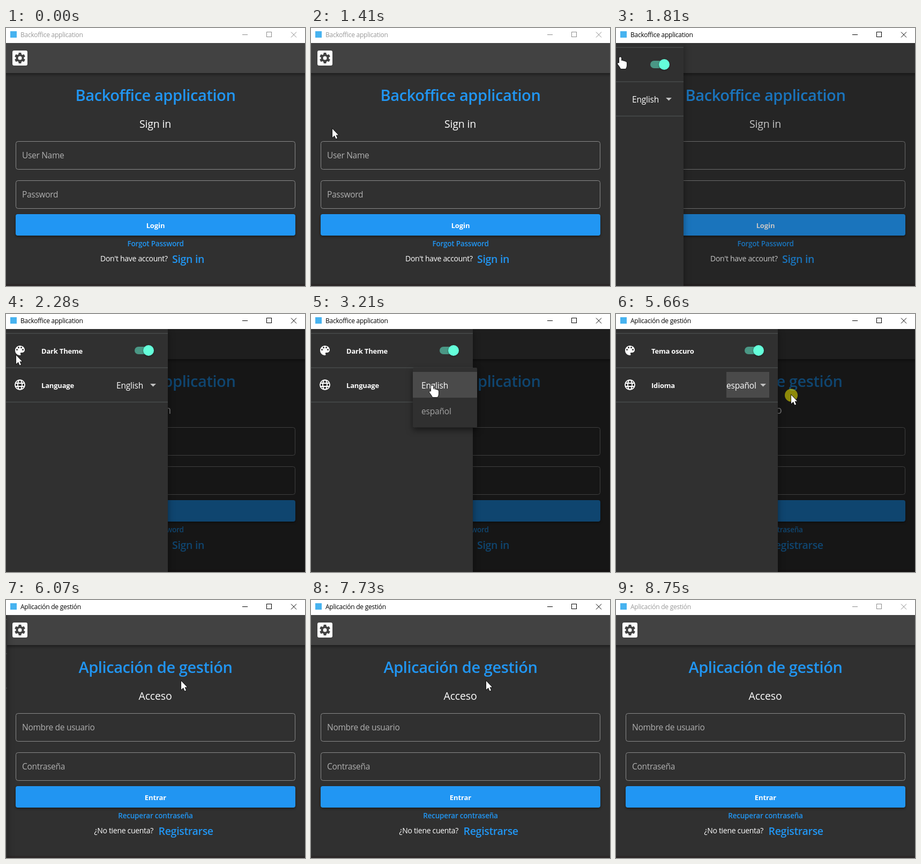
An HTML page with a canvas for the animation above (8880 ms loop, 558 px wide and 481 px high).

```html
<!DOCTYPE html>
<html lang="en">
<head>
<meta charset="utf-8">
<title>Backoffice application</title>
<style>
html, body { margin: 0; width: 100%; height: 100%; overflow: hidden; background: #303030; }
canvas { display: block; }
</style>
</head>
<body>
<canvas id="stage" width="558" height="481"></canvas>
<script>
const LOOP = 8880, W = 558, H = 481, DRAWER = 302;
const ctx = document.getElementById('stage').getContext('2d');

const EN = {
  app: 'Backoffice application', heading: 'Sign in', user: 'User Name', pass: 'Password',
  login: 'Login', forgot: 'Forgot Password', ask: "Don't have account?", askX: 176,
  join: 'Sign in', joinX: 310, theme: 'Dark Theme', lang: 'Language', name: 'English'
};
const ES = {
  app: 'Aplicación de gestión', heading: 'Acceso', user: 'Nombre de usuario', pass: 'Contraseña',
  login: 'Entrar', forgot: 'Recuperar contraseña', ask: '¿No tiene cuenta?', askX: 164.5,
  join: 'Registrarse', joinX: 284.5, theme: 'Tema oscuro', lang: 'Idioma', name: 'español'
};

const OPEN = 1747, MENU_OPEN = 3030, MENU_CLOSE = 4550, SWITCH = 4590, CLOSE = 5740;
const CLICKS = [[1600, 1740], [2900, 3130], [4470, 4690], [5660, 5960]];
const PATH = [
  [1130, 110, 478], [1580, 8, 54], [1950, 8, 54], [2280, 19, 77], [2820, 226, 133],
  [3810, 226, 133], [3940, 226, 181], [5130, 226, 181], [5520, 327, 151],
  [7730, 327, 151], [8280, 332, 482]
];

const ARROW = new Path2D('M0 0V16L4 12.5L6.5 18.5L9 17.5L6.5 11.5H11Z');
const HAND = new Path2D('M-2 1.5Q0-1.5 2 1.5V7Q4 6 5.5 7.5Q7.5 7 9 8.5Q12 8 12 11V16Q12 19 10 22H1Q-1 18-5 13Q-5 10-2 11.5Z');
const PALETTE = new Path2D('M12 3c-4.97 0-9 4.03-9 9s4.03 9 9 9c.83 0 1.5-.67 1.5-1.5 0-.39-.15-.74-.39-1.01-.23-.26-.38-.61-.38-.99 0-.83.67-1.5 1.5-1.5H16c2.76 0 5-2.24 5-5 0-4.42-4.03-8-9-8z');

const clamp = v => Math.min(1, Math.max(0, v));
const ramp = (t, from, length) => clamp((t - from) / length);

// Critically damped spring from 0 to 1.
function spring(ms) {
  if (ms <= 0) return 0;
  const k = 22.36 * ms / 1000;
  return 1 - (1 + k) * Math.exp(-k);
}

function text(str, x, y, size, color, { weight = 400, gap = -0.2, align = 'left' } = {}) {
  ctx.font = `${weight} ${size}px "Open Sans", "Noto Sans", sans-serif`;
  ctx.letterSpacing = gap + 'px';
  ctx.textAlign = align;
  ctx.fillStyle = color;
  ctx.fillText(str, x, y);
}

function rect(x, y, w, h, color) {
  ctx.fillStyle = color;
  ctx.fillRect(x, y, w, h);
}

function round(x, y, w, h, r, color) {
  ctx.beginPath();
  ctx.roundRect(x, y, w, h, r);
  ctx.fillStyle = color;
  ctx.fill();
}

function disc(x, y, r, color) {
  ctx.beginPath();
  ctx.arc(x, y, r, 0, 7);
  ctx.fillStyle = color;
  ctx.fill();
}

function lines(color, width, ...segments) {
  ctx.beginPath();
  for (const [x1, y1, x2, y2] of segments) {
    ctx.moveTo(x1, y1);
    ctx.lineTo(x2, y2);
  }
  ctx.strokeStyle = color;
  ctx.lineWidth = width;
  ctx.stroke();
}

function shadowed(blur, dy, alpha, draw) {
  ctx.save();
  ctx.shadowColor = `rgba(0,0,0,${alpha})`;
  ctx.shadowBlur = blur;
  ctx.shadowOffsetY = dy;
  draw();
  ctx.restore();
}

function titleBar(t, s) {
  const active = t >= 1640 && t < 8750;
  const ink = active ? '#000' : '#8c8c8c';
  rect(0, 0, W, 28, '#fff');
  rect(8, 6, 12, 12, '#47b3f0');
  text(s.app, 27, 17, 12, active ? '#000' : '#999', { gap: -0.24 });
  lines(ink, 1, [441, 12.5, 451, 12.5], [532, 7.5, 542, 17.5], [542, 7.5, 532, 17.5]);
  ctx.strokeRect(486.5, 7.5, 9, 9);
}

function gear(x, y) {
  round(x - 14, y - 14, 28, 28, 3, '#fff');
  ctx.save();
  ctx.translate(x, y);
  disc(0, 0, 7.4, '#424242');
  for (let i = 0; i < 6; i++) {
    round(-2.6, -10, 5.2, 6, 1, '#424242');
    ctx.rotate(Math.PI / 3);
  }
  disc(0, 0, 3.5, '#fff');
  ctx.restore();
}

function field(label, y, hover) {
  ctx.beginPath();
  ctx.roundRect(18.5, y + 0.5, 521, 52, 4);
  ctx.strokeStyle = hover ? '#a8a8a8' : '#8a8a8a';
  ctx.lineWidth = 1;
  ctx.stroke();
  text(label, 30, y + 32, 15.5, '#b0b0b0', { gap: -0.3 });
}

function page(s, over) {
  const mid = { align: 'center' };
  rect(0, 28, W, H - 28, '#303030');
  shadowed(6, 2, 0.5, () => rect(-10, 28, W + 20, 56, '#424242'));
  gear(26, 56);
  text(s.app, 279, 136, 29, '#2196f3', { ...mid, weight: 600, gap: -0.4 });
  text(s.heading, 278.5, 186, 19.5, '#fff', { ...mid, gap: -0.15 });
  field(s.user, 211, over === 'user');
  field(s.pass, 284, over === 'pass');
  shadowed(4, 2, 0.45, () => round(18, 347, 522, 40, 4, '#2196f3'));
  if (over === 'login') round(18, 347, 522, 40, 4, 'rgba(255,255,255,.08)');
  text(s.login, 279, 373, 13, '#fff', { ...mid, weight: 700, gap: -0.1 });
  text(s.forgot, 279, 407, 13.5, '#2196f3', { ...mid, weight: 600 });
  text(s.ask, s.askX, 435, 14, '#fff', { gap: -0.3 });
  text(s.join, s.joinX, 438, 19.5, '#2196f3', { weight: 600, gap: -0.3 });
  rect(0, 477, W, 4, 'rgba(30,10,10,.2)');
}

function globe(x, y) {
  ctx.beginPath();
  ctx.arc(x, y, 9, 0, 7);
  ctx.moveTo(x + 4, y);
  ctx.ellipse(x, y, 4, 9, 0, 0, 7);
  ctx.strokeStyle = '#fff';
  ctx.lineWidth = 1.9;
  ctx.stroke();
  lines('#fff', 1.9, [x - 8.5, y - 3, x + 8.5, y - 3], [x - 8.5, y + 3, x + 8.5, y + 3]);
}

function drawer(s, open, focused) {
  rect(0, 28, W, H - 28, `rgba(0,0,0,${0.54 * open})`);
  ctx.save();
  ctx.beginPath();
  ctx.rect(0, 28, W, H - 28);
  ctx.clip();
  ctx.translate(Math.round(DRAWER * (open - 1)), 0);
  shadowed(12, 4, 0.4, () => rect(0, 28, DRAWER, H - 28, '#303030'));
  for (const y of [36, 100, 164]) rect(0, y - 0.5, DRAWER, 1.5, '#474a4a');

  ctx.save();
  ctx.translate(14, 56);
  ctx.fillStyle = '#fff';
  ctx.fill(PALETTE);
  for (const [x, y] of [[6.5, 10.5], [9.5, 6.5], [14.5, 6.5], [17.5, 10.5]]) disc(x, y, 1.5, '#303030');
  ctx.restore();
  globe(26, 132);
  text(s.theme, 66, 74, 13, '#fff', { weight: 700 });
  text(s.lang, 66, 138, 13, '#fff', { weight: 700 });

  round(240, 61, 34, 14, 7, '#4a9785');
  shadowed(3, 1, 0.5, () => disc(266, 68, 10, '#64ffda'));

  if (focused) rect(206, 108, 80, 48, '#4a4a4a');
  text(s.name, 206, 139, 15.5, '#fff');
  ctx.beginPath();
  ctx.moveTo(269, 130);
  ctx.lineTo(280, 130);
  ctx.lineTo(274.5, 135.5);
  ctx.fillStyle = '#c1c1c1';
  ctx.fill();
  ctx.restore();
}

function menu(t, pointerY) {
  const alpha = ramp(t, MENU_OPEN, 75) * (1 - ramp(t, MENU_CLOSE, 75));
  if (!alpha) return;
  const grow = ramp(t, MENU_OPEN + 75, 75);
  const top = 108 - 8 * grow, bottom = 156 + 55.5 * grow;
  ctx.save();
  ctx.globalAlpha = alpha;
  shadowed(12, 5, 0.5, () => round(190, top, 120, bottom - top, 2, '#303030'));
  ctx.beginPath();
  ctx.rect(190, top, 120, bottom - top);
  ctx.clip();
  rect(190, 108, 120, 48, '#4a4a4a');
  if (pointerY > 156) rect(190, 156, 120, 48, '#393939');
  [EN, ES].forEach((s, i) => {
    ctx.globalAlpha = alpha * ramp(t, MENU_OPEN + 75 + 50 * i, 100);
    text(s.name, 206, 139 + 48 * i, 15.5, '#fff');
  });
  ctx.restore();
}

function pointerAt(t) {
  const i = PATH.findIndex(p => p[0] > t);
  if (i < 1) return null;
  const [t0, x0, y0] = PATH[i - 1], [t1, x1, y1] = PATH[i];
  const u = (t - t0) / (t1 - t0), e = u * u * (3 - 2 * u);
  return { x: Math.round(x0 + (x1 - x0) * e), y: Math.round(y0 + (y1 - y0) * e) };
}

function hit({ x, y }) {
  if (x < 18 || x > 540) return '';
  if (y >= 211 && y < 264) return 'user';
  if (y >= 284 && y < 337) return 'pass';
  return y >= 347 && y < 387 ? 'login' : '';
}

function pointer(t, p, over) {
  const click = CLICKS.find(([from, to]) => t >= from && t < to);
  if (click) {
    const fade = 1 - ramp(t, click[1] - 60, 60);
    disc(p.x, p.y + 0.5, 12, `rgba(235,228,0,${0.56 * fade})`);
  }
  ctx.save();
  ctx.translate(p.x, p.y);
  if (over === 'user' || over === 'pass') {
    lines('#fff', 1, [0.5, -8, 0.5, 8], [-3, -8.5, 4, -8.5], [-3, 8.5, 4, 8.5]);
  } else {
    const hand = over === 'login' || (t > 1500 && t < 1960) || (t > 2780 && t < 5140);
    const shape = hand ? HAND : ARROW;
    ctx.strokeStyle = '#111';
    ctx.lineWidth = 1.6;
    ctx.stroke(shape);
    ctx.fillStyle = '#fff';
    ctx.fill(shape);
  }
  ctx.restore();
}

function draw(t) {
  const s = t < SWITCH ? EN : ES;
  const open = spring(t - OPEN) - spring(t - CLOSE);
  const p = pointerAt(t);
  const over = p && open < 0.01 ? hit(p) : '';
  page(s, over);
  if (open > 0.003) drawer(s, open > 0.997 ? 1 : open, t >= SWITCH);
  menu(t, p ? p.y : 0);
  titleBar(t, s);
  if (p) pointer(t, p, over);
}

const start = performance.now();
function tick() {
  draw((performance.now() - start) % LOOP);
  requestAnimationFrame(tick);
}
tick();
</script>
</body>
</html>
```
